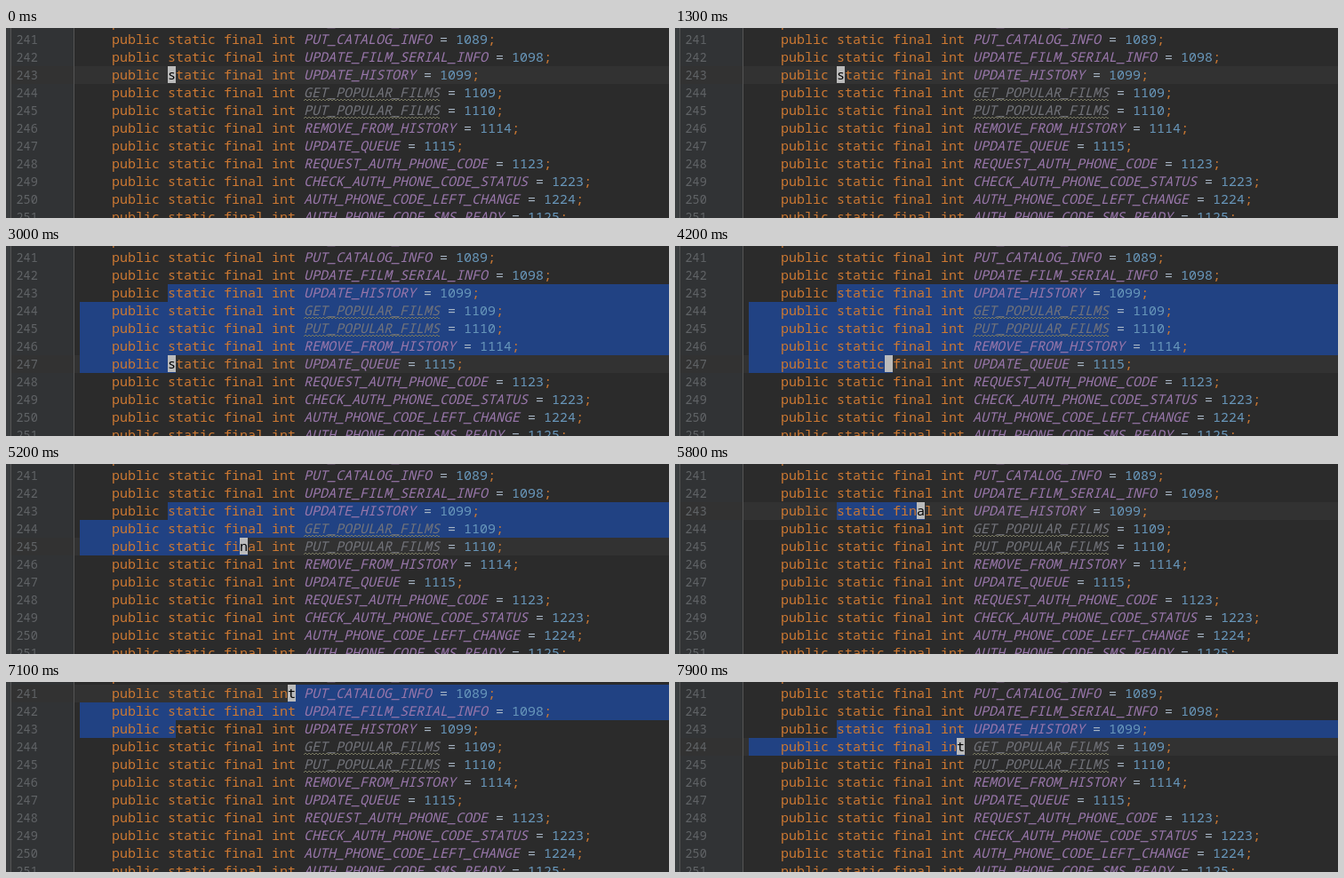
An HTML page for the animation above (8 s loop, 746 by 214 pixels).

```html
<!DOCTYPE html>
<html lang="en">
<head>
<meta charset="utf-8">
<title>Visual selection</title>
<style>
  html, body { margin: 0; width: 100%; height: 100%; overflow: hidden; background: #2b2b2b; }
  #stage {
    position: relative; width: 746px; height: 214px; overflow: hidden;
    background: #2b2b2b; color: #a9b7c6;
    font: 15px/18px "Noto Sans Mono", "DejaVu Sans Mono", monospace;
    white-space: pre; font-variant-ligatures: none;
  }
  #stage div { position: absolute; height: 20px; }
  #stage .strip { left: 0; top: 0; width: 5px; height: 214px; background: #3a3d3f; border-right: 1px solid #555; }
  #stage .gutter { left: 6px; top: 0; width: 70px; height: 214px; background: #313335; }
  #stage .edge { left: 76px; top: 0; width: 1px; height: 214px; background: #555; }
  .num { left: 11.5px; color: #606366; font-size: 13.5px; line-height: 20px; }
  .code { left: 119px; }
  .key { color: #cc7832; }
  .name { color: #9876aa; font-style: italic; }
  .unused { color: #72737a; font-style: italic; }
  .value { color: #6897bb; }
  #caretRow { left: 6px; right: 0; background: #323232; }
  .sel { background: #214283; }
  #stage #cursor { width: 9px; height: 19px; background: #bbb; color: #000; }
  svg { position: absolute; left: 335px; width: 153px; height: 4px; fill: none; stroke: #77775f; }
</style>
</head>
<body>
<div id="stage">
  <div class="strip"></div>
  <div class="gutter"></div>
  <div id="caretRow"></div>
  <div class="edge"></div>
</div>
<script>
const LOOP = 8000, CELL = 9, ROW = 20, CODE_X = 119, TEXT_X = 83, WIDTH = 746;
const FIRST = 240, PREFIX = 'public static final int ';
const ANCHOR = { line: 243, col: 7 };
const constants = [
  'GET_CATALOG_INFO = 1088', 'PUT_CATALOG_INFO = 1089', 'UPDATE_FILM_SERIAL_INFO = 1098',
  'UPDATE_HISTORY = 1099', 'GET_POPULAR_FILMS = 1109', 'PUT_POPULAR_FILMS = 1110',
  'REMOVE_FROM_HISTORY = 1114', 'UPDATE_QUEUE = 1115', 'REQUEST_AUTH_PHONE_CODE = 1123',
  'CHECK_AUTH_PHONE_CODE_STATUS = 1223', 'AUTH_PHONE_CODE_LEFT_CHANGE = 1224',
  'AUTH_PHONE_CODE_SMS_READY = 1125'
];

// Editor keys by time: h j k l motions, v starts the selection, b blinks the cursor off.
const keys = `600b 900j 1300k 1800v 2100j 2400j 2700j 3000j
  3200l 3400l 3600l 3800l 4000l 4200l 4400l 4600l 4700l 4900k 5200k 5400k 5500k
  5800l 6000l 6200l 6300l 6500l 6700l 7000k 7100k 7600j 7800j 7900j`
  .split(/\s+/).map(k => ({ time: parseInt(k), key: k.slice(-1) }));

const stage = document.getElementById('stage');
const caretRow = document.getElementById('caretRow');
const rowTop = line => 3 + (line - 241) * ROW;

function add(className, line, html = '') {
  const el = document.createElement('div');
  el.className = className;
  el.style.top = rowTop(line) + 'px';
  el.innerHTML = html;
  stage.append(el);
  return el;
}

const bands = constants.map((_, i) => add('sel', FIRST + i));

constants.forEach((text, i) => {
  const line = FIRST + i, [name, value] = text.split(' = ');
  const unused = name.includes('POPULAR');
  add('num', line, line);
  add('code', line, `<span class="key">${PREFIX}</span>` +
    `<span class="${unused ? 'unused' : 'name'}">${name}</span> = ` +
    `<span class="value">${value}</span><span class="key">;</span>`);
  if (unused) {
    const wave = 'M0 3' + 'l2 -2l2 2'.repeat(39);
    stage.insertAdjacentHTML('beforeend',
      `<svg style="top:${rowTop(line) + 16}px"><path d="${wave}"/></svg>`);
  }
});

const cursor = add('', FIRST);
cursor.id = 'cursor';

function stateAt(time) {
  const s = { ...ANCHOR, visual: false, shown: true };
  for (const { time: at, key } of keys) {
    if (at > time) break;
    s.shown = key !== 'b';
    if (key === 'v') s.visual = true;
    s.line += (key === 'j') - (key === 'k');
    s.col += (key === 'l') - (key === 'h');
  }
  return s;
}

function render(time) {
  const s = stateAt(time);
  const down = s.line > ANCHOR.line || (s.line === ANCHOR.line && s.col >= ANCHOR.col);
  const [from, to] = down ? [ANCHOR, s] : [s, ANCHOR];

  caretRow.style.top = cursor.style.top = rowTop(s.line) + 'px';
  cursor.style.left = CODE_X + s.col * CELL + 'px';
  cursor.style.visibility = s.shown ? 'visible' : 'hidden';
  cursor.textContent = PREFIX[s.col];

  bands.forEach((band, i) => {
    const line = FIRST + i;
    const left = line === from.line ? CODE_X + from.col * CELL : TEXT_X;
    const right = line === to.line ? CODE_X + (to.col + 1) * CELL : WIDTH;
    band.hidden = !s.visual || line < from.line || line > to.line;
    band.style.left = left + 'px';
    band.style.width = right - left + 'px';
  });
}

const start = performance.now();
function tick() {
  render((performance.now() - start) % LOOP);
  requestAnimationFrame(tick);
}
tick();
</script>
</body>
</html>
```
